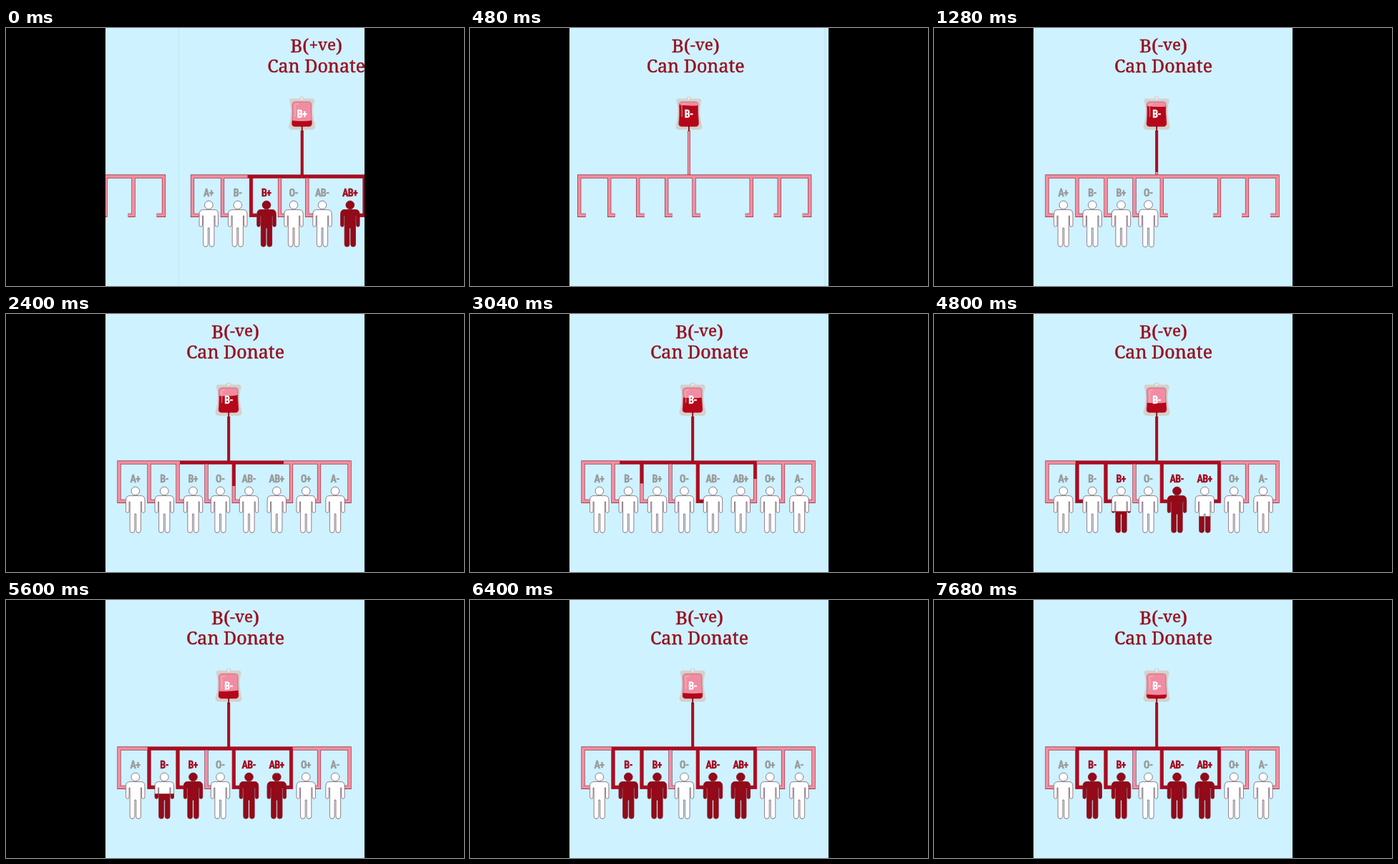
Recreate the animation shown at these times as an HTML page. Size 640 by 360 pixels, loop 7840 ms.

```html
<!DOCTYPE html>
<html lang="en">
<head>
<meta charset="utf-8">
<title>Blood donation</title>
<style>
  html, body { margin: 0; width: 100%; height: 100%; overflow: hidden; background: #000; }
  svg { display: block; }
  text { text-anchor: middle; }
  .title { font: 25px "Noto Serif", serif; fill: #96101f; stroke: #96101f; stroke-width: .45; }
  .title.type { font-size: 26px; }
  .title .small { font-size: 22.5px; }
  .label {
    font: 700 14px "Roboto Condensed", "Open Sans Condensed", Roboto, Arial, sans-serif;
    font-stretch: 75%; letter-spacing: -.6px;
    fill: #999; stroke: #999; stroke-width: .4;
  }
  .label.on { fill: #a3091d; stroke: #a3091d; }
  .label.bag { fill: #fff; stroke: #fff; }
  .pipe, .flow { fill: none; }
  .edge { stroke: #7c2638; stroke-width: 5.2; }
  .pink { stroke: #f58c9f; stroke-width: 4; }
  .flow { stroke: #ae0a20; stroke-width: 4.4; }
  .edge.tube { stroke-width: 4; }
  .pink.tube { stroke-width: 3; }
  .flow.tube { stroke-width: 3.6; }
  .body { fill: #fff; stroke: #5c2a38; stroke-width: .6; }
  .blood { fill: #930a19; stroke: #930a19; stroke-width: .6; }
</style>
</head>
<body>
<svg width="100%" height="100%" viewBox="0 0 640 360">
  <defs>
    <g id="person">
      <circle cy="247" r="5.8"/>
      <path d="M-8 253.6H8Q13.2 253.6 13.2 260V275a2.2 2.2 0 0 1-4.4 0V262h-1.2V302q0 3-3 3h-.8q-2.8 0-2.8-3V279h-2V302q0 3-2.8 3h-.8q-3 0-3-3V262h-1.2V275a2.2 2.2 0 0 1-4.4 0V260Q-13.2 253.6-8 253.6Z"/>
    </g>
    <path id="pouch" d="M302 103H320Q324.5 103 324 107.5Q323.5 118 325 132Q325.5 137.5 320 137.5H302Q296.5 137.5 297 133Q298.5 118 297.5 107.5Q297.5 103 302 103Z"/>
    <clipPath id="pouchClip"><use href="#pouch"/></clipPath>
    <path id="pipes" d="M167 261.3H158V207.2H480V261.3H470M200 207V261.3H208M240 207V261.3H249M280 207V261.3H288M318.3 207V261.3H327M398.5 207V261.3H390M437.5 207V261.3H430"/>
  </defs>
  <svg x="139" width="362" height="360" viewBox="139 0 362 360">
    <rect x="139" width="362" height="360" fill="#cef2ff"/>
    <g id="stage"></g>
  </svg>
</svg>
<script>
const LOOP = 7840, STEP = 160, WIDTH = 362, SLIDE_FROM = 102.5;
const FOOT = 305.5, TALL = 65;
const PEOPLE = [["A+", 180.8], ["B-", 221.3], ["B+", 261.5], ["O-", 299.5],
                ["AB-", 339.5], ["AB+", 378.3], ["O+", 419.2], ["A-", 460]];
const TUBE = "M311.2 143V207";
const RIGHT = "M311 207.2H398.5V261.3H390";
const TO_B_PLUS = "M240 207V261.3H249";

const stage = document.getElementById("stage");

function add(parent, tag, attrs = {}, text = "") {
  const el = document.createElementNS("http://www.w3.org/2000/svg", tag);
  for (const key in attrs) el.setAttribute(key, attrs[key]);
  el.textContent = text;
  parent.append(el);
  return el;
}

// Piecewise linear value through [time, value] points
function track(t, points) {
  if (t <= points[0][0]) return points[0][1];
  for (let i = 1; i < points.length; i++) {
    const [t0, a] = points[i - 1], [t1, b] = points[i];
    if (t < t1) return a + (b - a) * (t - t0) / (t1 - t0);
  }
  return points[points.length - 1][1];
}

function addBag(root, type) {
  add(root, "circle", { cx: 311, cy: 99, r: 3.4, fill: "#d8d4d0" });
  add(root, "path", { fill: "#d5d1cc", d: "M297 98.5Q293 98 294 103Q296.5 112 295.5 120Q295 130 292.5 137Q292 142 298 142H324Q330 142 329.5 137Q327 128 326.5 118Q326.5 108 328.5 103Q329 98 325 98.5Z" });
  add(root, "circle", { cx: 311, cy: 98.6, r: 1.4, fill: "#eef4f5" });
  add(root, "use", { href: "#pouch", fill: "#f18da3" });
  const level = add(root, "path", { fill: "#b50719", "clip-path": "url(#pouchClip)" });
  add(root, "use", { href: "#pouch", fill: "none", stroke: "#b8465a", "stroke-width": .6 });
  add(root, "path", { d: "M301.5 124Q302 113 301 109Q301 106 306 106", fill: "none", stroke: "#fac5d0", "stroke-width": 1.5, opacity: .5 });
  add(root, "path", { d: "M311.2 136V144", stroke: "#7c0a1a", "stroke-width": 1.8 });
  add(root, "text", { x: 311, y: 125.2, class: "label bag" }, type);
  return level;
}

function addTitle(root, sign, x) {
  const line = add(root, "text", { x, y: 34, class: "title type" }, "B(");
  add(line, "tspan", { class: "small", dy: -3 }, sign + "ve");
  add(line, "tspan", { dy: 3 }, ")");
  add(root, "text", { x, y: 61.5, class: "title" }, "Can Donate");
}

function addPipe(root, shape, kind) {
  for (const layer of ["edge", "pink"]) add(root, "path", { ...shape, class: `pipe ${layer} ${kind}` });
}

function addPerson(root, [name, x], id) {
  const group = add(root, "g");
  const clip = add(add(group, "clipPath", { id }), "rect", { x: -20, y: FOOT, width: 40, height: 70 });
  const label = add(group, "text", { x: -.3, y: 235.3, class: "label" }, name);
  add(group, "use", { href: "#person", class: "body" });
  add(group, "use", { href: "#person", class: "blood", "clip-path": `url(#${id})` });
  return {
    show(scale) {
      group.setAttribute("visibility", scale ? "visible" : "hidden");
      group.setAttribute("transform", `translate(${x} ${272 * (1 - scale)}) scale(${scale})`);
    },
    fill(part) {
      clip.setAttribute("y", FOOT - TALL * part);
      label.classList.toggle("on", part > 0);
    }
  };
}

function makeScene(sign, titleX, flowPaths) {
  const root = add(stage, "g");
  addTitle(root, sign, titleX);
  addPipe(root, { d: TUBE }, "tube");
  addPipe(root, { d: document.getElementById("pipes").getAttribute("d") }, "");
  const flows = flowPaths.map(d => add(root, "path", { d, class: d === TUBE ? "flow tube" : "flow" }));
  const level = addBag(root, "B" + sign);
  const people = PEOPLE.map((p, i) => addPerson(root, p, (sign === "+" ? "plus" : "minus") + i));
  return {
    root, people,
    move(x) { root.setAttribute("transform", `translate(${x} 0)`); },
    flow(i, length) { flows[i].setAttribute("stroke-dasharray", `${length} 999`); },
    level(y, tilt) {
      level.setAttribute("d", `M290 ${y - 1 - tilt}Q311 ${y + 3} 332 ${y - 1 + tilt}V140H290Z`);
    }
  };
}

const before = makeScene("+", 331.2, [TUBE, "M311 207.2H235", TO_B_PLUS, RIGHT]);
add(before.root, "path", { d: "M139 0V360", stroke: "#b9dfee", "stroke-width": .6 });
before.people.forEach((p, i) => { p.show(1); p.fill(i === 2 || i === 5 ? 1 : 0); });
before.level(129, 0);

const now = makeScene("-", 320.5, [TUBE, "M311 207.2H200V261.3H208", RIGHT,
  TO_B_PLUS, "M318.3 207V261.3H327"]);

const FLOWS = [
  [[760, 0], [1280, 58], [1340, 64]],
  [[1340, 0], [2400, 68], [3840, 144], [4420, 173]],
  [[1340, 0], [2400, 77], [3800, 150]],
  [[2460, 0], [3700, 63]],
  [[1480, 0], [2400, 33], [3000, 63]]
];
const LEVEL = [[760, 107.5], [1280, 109], [2400, 113.5], [3840, 120], [4800, 123.5], [6400, 129.5], [7680, 131.5]];
const FILL_START = { 4: 3420, 2: 4200, 5: 4340, 1: 4900 };
const FILL_TIME = 1290;

function render(t) {
  const p = Math.min(t / 560, 1);
  const slide = SLIDE_FROM + (WIDTH - SLIDE_FROM) * (1 - (1 - p) ** 2);
  before.move(slide);
  now.move(slide - WIDTH);

  FLOWS.forEach((points, i) => now.flow(i, track(t, points)));
  now.level(track(t, LEVEL), .8 * Math.sin(t / 500));
  now.people.forEach((person, i) => {
    const born = 640 + i * 190;
    person.show(t < born ? 0 : track(t, [[born, 1.03], [born + 160, 1]]));
    const start = FILL_START[i];
    person.fill(start ? track(t, [[start, 0], [start + FILL_TIME, 1]]) : 0);
  });
}

const origin = performance.now();
let last = -1;
function tick() {
  const elapsed = (performance.now() - origin) % LOOP;
  const t = Math.floor(elapsed / STEP) * STEP;
  if (t !== last) render(last = t);
  requestAnimationFrame(tick);
}
tick();
</script>
</body>
</html>
```
